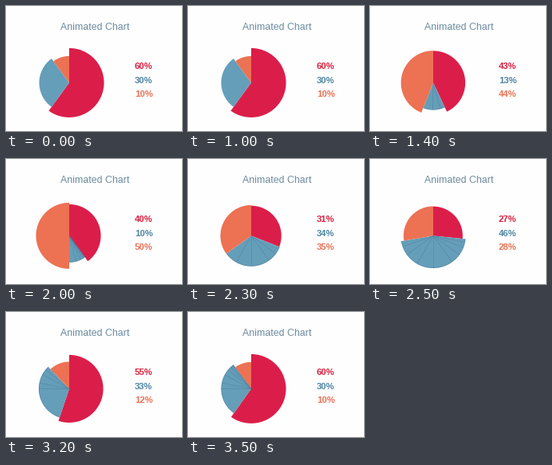
Animation of 220 by 157 pixels, one loop 3700 ms. Source, as a matplotlib script:

```python
import numpy as np
import matplotlib.pyplot as plt
from matplotlib.animation import FuncAnimation
from matplotlib.collections import LineCollection
from matplotlib.patches import Polygon

W, H, DPI = 220, 157, 100
STEP, FRAMES = 100, 37
CX, CY = 79.0, 96.4
PX = 72 / DPI  # one pixel in points

RED, BLUE, ORANGE = "#db1e49", "#659eb9", "#ed7153"
SHARES = [np.array(s, float) for s in ((60, 30, 10), (40, 10, 50), (25, 50, 25))]
STARTS = (1060, 2115, 2850)
DURATION = 900
HELD = {15: 14, 36: 35}  # ticks that repeat the one before


def ease_out(u):
    return 1 - (1 - min(max(u, 0), 1)) ** 4


def phase_at(t):
    return sum(t >= s for s in STARTS) - 1


def shares_at(t):
    k = phase_at(t)
    if k < 0:
        return SHARES[0]
    a, b = SHARES[k], SHARES[(k + 1) % 3]
    return a + (b - a) * ease_out((t - STARTS[k]) / DURATION)


def radius(share):
    return 31.5 + 0.2 * share


def polar(percent, r):
    """Points at clockwise percentages of the turn, starting at the top."""
    a = np.asarray(percent) * 2 * np.pi / 100
    return np.column_stack([CX + r * np.sin(a), CY - r * np.cos(a)])


def arc(start, share, r):
    return polar(np.linspace(start, start + share, 80), r)


def wedge(start, share):
    return np.vstack([[CX, CY], arc(start, share, radius(share))])


def trail(tick, shares):
    """Rim of the blue slice and the seams left in it by its earlier edges."""
    k = phase_at(tick * STEP)
    if k < 0:
        return []
    lo, hi = shares[0], shares[0] + shares[1]
    r = radius(shares[1]) - 0.4
    lines = [arc(lo, shares[1], r)]
    for past in range(STARTS[k] // STEP, tick):
        red, blue, _ = shares_at(past * STEP)
        for edge in (red, red + blue):
            if lo < edge < hi:
                lines.append(np.vstack([[CX, CY], polar([edge], r)]))
    return lines


fig = plt.figure(figsize=(W / DPI, H / DPI), dpi=DPI, facecolor="#fefefe")
ax = fig.add_axes([0, 0, 1, 1])
ax.set_xlim(0, W)
ax.set_ylim(H, 0)
ax.axis("off")

ax.text(111.3, 29.6, "Animated Chart", family="Liberation Sans", size=12.4 * PX,
        color="#6d8ca0", ha="center", va="baseline")

slices, labels = [], []
for i, (fill, ink) in enumerate(((RED, "#d8213f"), (BLUE, "#4f87a3"), (ORANGE, "#ea7357"))):
    slices.append(ax.add_patch(Polygon([(CX, CY)] * 3, fc=fill, ec="none", zorder=2)))
    labels.append(ax.text(160.8, 79.3 + 17.4 * i, "", family="Liberation Sans",
                          weight="bold", size=11.3 * PX, color=ink, va="baseline"))
seams = ax.add_collection(
    LineCollection([], colors="#4a7798", linewidths=0.6 * PX, alpha=0.6, zorder=3))


def draw(tick):
    tick = HELD.get(tick, tick)
    shares = shares_at(tick * STEP)
    start = 0
    for part, label, share in zip(slices, labels, shares):
        part.set_xy(wedge(start, share))
        label.set_text(f"{share:.0f}%")
        start += share
    seams.set_segments(trail(tick, shares))
    return [*slices, *labels, seams]


anim = FuncAnimation(fig, draw, frames=FRAMES, interval=STEP, repeat=True,
                     repeat_delay=0, blit=False)
plt.show()
```
